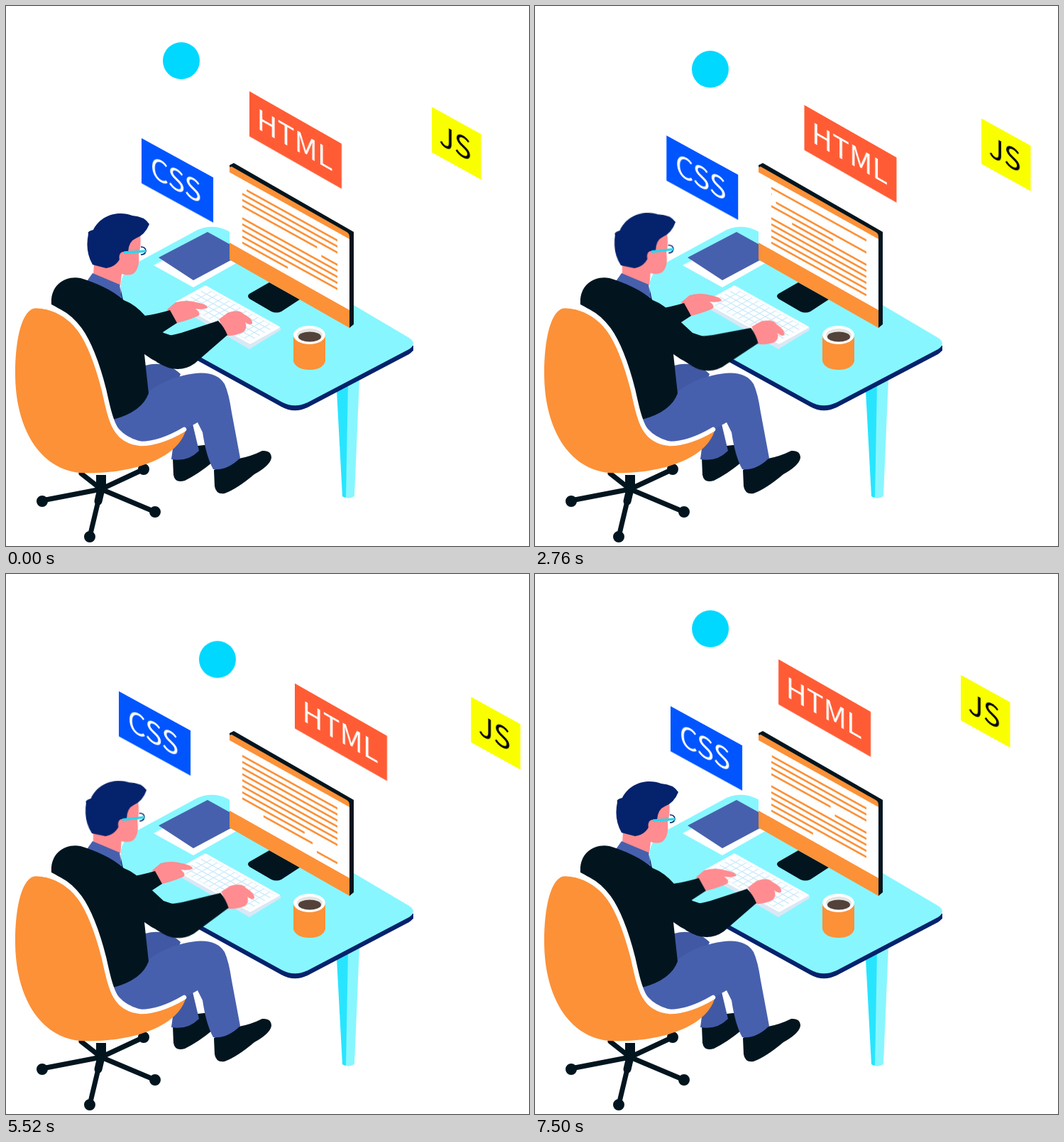
Animation of 737x760 px, one loop 7560 ms. Source, as an HTML page without scripts:

```html
<!DOCTYPE html>
<html lang="en">
<head>
<meta charset="utf-8">
<title>Developer at a desk</title>
<style>
html, body { margin: 0; width: 100%; height: 100%; overflow: hidden; background: #fff; }
svg { display: block; width: 737px; height: 760px; }
text { font: 40px "Noto Sans CJK SC", "Noto Sans CJK JP", "Noto Sans CJK", Lato, sans-serif; text-anchor: middle; fill: #fff; }

.ink { fill: #02151f; }
.orange { fill: #fc9138; }
.navy { fill: #05226c; }
.denim { fill: #4760ad; }
.shade { fill: #4159a4; }
.skin { fill: #ff8c90; }
.sky { fill: #88f6ff; }
.white { fill: #fff; }
.base { fill: none; stroke: #02151f; stroke-linecap: round; }

.css, .js, .ball, .head, .far, .near { animation: 7560ms cubic-bezier(.37, 0, .63, 1) infinite; }
.css { animation-name: css; }
.js { animation-name: js; }
.html { animation: html 1890ms cubic-bezier(.37, 0, .63, 1) infinite alternate; }
.ball { animation-name: ball; }
.head { animation-name: nod; transform-origin: 142px 385px; }
.far { animation-name: far; }
.near { animation-name: near; transform-origin: 225px 488px; }

@keyframes css {
  0%, 43%, 50.4%, 99%, 100% { transform: none; }
  19.8%, 73.2%, 79.4% { transform: translate(-32px, -21px); }
}
@keyframes html { to { transform: translate(65px, 34.5px); } }
@keyframes js {
  0%, 49.2%, 98.4%, 100% { transform: none; }
  24.6%, 73.8% { transform: translate(55.5px, 31px); }
}
@keyframes ball {
  0%, 100% { transform: translate(247px, 77px); }
  23% { transform: translate(305px, 132px); animation-timing-function: ease-in; }
  36.5% { transform: translate(247px, 89px); animation-timing-function: linear; }
  41.3% { transform: translate(231px, 75px); animation-timing-function: ease-out; }
  47.4% { transform: translate(183px, 38px); }
  74.7% { transform: translate(299px, 121px); }
}
@keyframes nod {
  0%, 100% { transform: none; }
  7.4% { transform: rotate(-4deg); }
  23.8% { transform: rotate(6deg); }
  41% { transform: rotate(-4.5deg); }
  60% { transform: rotate(8.5deg); }
  78% { transform: rotate(-5.2deg); }
}
@keyframes far {
  0%, 100% { transform: none; }
  8%, 46%, 62%, 90% { transform: translate(-21px, -10px); }
  54% { transform: translate(-8px, -6px); }
}
@keyframes near {
  0%, 100% { transform: none; }
  12%, 22% { transform: rotate(8.4deg); }
  36.5% { transform: rotate(7.5deg); }
  54% { transform: rotate(6.5deg); }
  64.3% { transform: rotate(3deg); }
  82%, 90% { transform: rotate(6deg); }
}

/* Two gaps run through the rows in reading order: 10 rows of 134 */
.rows { stroke: #fc9138; stroke-width: 3; }
.rows g { transform: translateY(calc(var(--i) * 8.55px)); }
.short, .long { stroke: #fff; stroke-width: 5; }
.short { stroke-dasharray: 76 1264; animation: short 7560ms linear infinite; }
.long { stroke-dasharray: 140 1200; animation: long 7560ms linear infinite; }
@keyframes short {
  0% { stroke-dashoffset: calc(var(--i) * 134px + 70px); }
  54% { stroke-dashoffset: calc(var(--i) * 134px - 757px); }
  81.75% { stroke-dashoffset: calc(var(--i) * 134px - 1149px); }
  100% { stroke-dashoffset: calc(var(--i) * 134px - 1270px); }
}
@keyframes long {
  0% { stroke-dashoffset: calc(var(--i) * 134px - 507px); }
  22.22% { stroke-dashoffset: calc(var(--i) * 134px - 1193px); }
  36.5% { stroke-dashoffset: calc(var(--i) * 134px - 1474px); }
  54% { stroke-dashoffset: calc(var(--i) * 134px - 1959px); }
  64.3% { stroke-dashoffset: calc(var(--i) * 134px - 2336px); }
  81.75% { stroke-dashoffset: calc(var(--i) * 134px - 2686px); }
  100% { stroke-dashoffset: calc(var(--i) * 134px - 3187px); }
}
</style>
</head>
<body>
<svg viewBox="0 0 737 760">
  <defs>
    <path id="line" d="M0 0H134"/>
    <path id="top" d="M270 315Q291 306 312 316L568 467Q580 475 568 483L425 558Q406 567 388 557L170 437L162 400Q158 376 185 361Z"/>
  </defs>

  <!-- floating labels -->
  <g class="css"><g transform="translate(191 186) skewY(28.7)">
    <rect width="101" height="63.5" fill="#0055ff"/><text x="48.5" y="46">CSS</text>
  </g></g>
  <g class="html"><g transform="translate(343 120) skewY(29.6)">
    <rect width="130" height="63.5" fill="#ff5c35"/><text x="64" y="46">HTML</text>
  </g></g>
  <g class="js"><g transform="translate(600 142) skewY(28.9)">
    <rect width="69.5" height="64" fill="#faff00"/><text x="33" y="46" style="fill:#000">JS</text>
  </g></g>
  <circle class="ball" r="26" fill="#00d8ff"/>

  <!-- legs and shoes -->
  <path class="ink" d="M235 636L270 619L288 617L291 642Q272 658 252 668Q238 672 236 660Z"/>
  <path class="ink" d="M293 653L328 637Q345 634 361 626Q374 625 374 636Q372 647 350 659Q325 680 308 686Q296 688 294 676Z"/>
  <path class="shade" d="M196 506Q225 498 246 518L230 560L196 560Z"/>
  <path class="shade" d="M238 600L262 584L272 626Q256 642 233 638Z"/>
  <path class="denim" d="M150 582L199 544Q222 526 250 520Q294 509 308 532Q314 545 318 572L330 636Q312 654 292 652Q282 634 277 600L270 586Q240 604 205 615Q165 612 150 582Z"/>

  <!-- desk -->
  <path d="M466 541L486 531L480 692Q476 692 474 690Z" fill="#28e5ff"/>
  <path class="sky" d="M482 533L498 525L491 690Q484 694 479 692Z"/>
  <use href="#top" class="navy" y="7"/>
  <path class="navy" d="M564 478H574V485L566 490Z"/>
  <use href="#top" class="sky"/>

  <path class="white" d="M208 365L250 342L326 361L264 396Z"/>
  <path class="denim" d="M215 354L284 318L322 339V355L264 386Z"/>

  <!-- monitor -->
  <path class="ink" d="M343 405L371 389L414 413L388 430Q381 433 374 430L343 412Q339 408 343 405Z"/>
  <path class="ink" d="M315 226V224L321 221L490 318V448L484 453Z"/>
  <path class="orange" d="M315 227L318 226L480 318Q484 320 484 325V453L315 357Z"/>
  <path class="white" d="M315 234L484 328V428L315 333Z"/>
  <g class="rows" transform="translate(333 256) skewY(28.9)">
    <g style="--i:0"><use href="#line"/><use href="#line" class="short"/><use href="#line" class="long"/></g>
    <g style="--i:1"><use href="#line"/><use href="#line" class="short"/><use href="#line" class="long"/></g>
    <g style="--i:2"><use href="#line"/><use href="#line" class="short"/><use href="#line" class="long"/></g>
    <g style="--i:3"><use href="#line"/><use href="#line" class="short"/><use href="#line" class="long"/></g>
    <g style="--i:4"><use href="#line"/><use href="#line" class="short"/><use href="#line" class="long"/></g>
    <g style="--i:5"><use href="#line"/><use href="#line" class="short"/><use href="#line" class="long"/></g>
    <g style="--i:6"><use href="#line"/><use href="#line" class="short"/><use href="#line" class="long"/></g>
    <g style="--i:7"><use href="#line"/><use href="#line" class="short"/><use href="#line" class="long"/></g>
    <g style="--i:8"><use href="#line"/><use href="#line" class="short"/><use href="#line" class="long"/></g>
    <g style="--i:9"><use href="#line"/><use href="#line" class="short"/><use href="#line" class="long"/></g>
  </g>

  <!-- keyboard -->
  <path d="M238 417L281 394L387 453V456L343 483L238 422Z" fill="#d9e8f4"/>
  <g transform="matrix(.883 .492 -.86 .48 281 393)">
    <rect width="120" height="50" rx="2" class="white"/>
    <rect x="5" y="4" width="110" height="42" fill="#c9e9fa"/>
    <path d="M5 8H115M5 16.5H115M5 25H115M5 33.5H115M5 42H115" stroke="#fff" stroke-width="7" stroke-dasharray="8 1.3"/>
  </g>

  <!-- mug -->
  <path class="orange" d="M405 463H450V500Q446 512 428 512Q409 512 405 500Z"/>
  <ellipse class="white" cx="427.500" cy="463" rx="22.500" ry="13"/>
  <ellipse cx="428" cy="463.500" rx="18" ry="9.500" fill="#e4e4e4"/>
  <ellipse cx="428" cy="465.500" rx="16" ry="7" fill="#53423a"/>

  <!-- far arm -->
  <g class="far">
    <path class="skin" d="M227 427L239 417Q255 413 268 417Q284 420 284 425Q276 428 267 426Q277 434 269 437Q252 444 237 447Z"/>
    <path class="ink" d="M160 425L195 436Q215 433 231 428L241 446L218 461L180 465Z"/>
  </g>

  <!-- head -->
  <g class="head">
    <path class="skin" d="M124 363L170 325L189 319Q191 338 187 349Q189 370 179 377Q172 380 163 377L161 394L123 380Z"/>
    <path class="navy" d="M116 321Q114 317 123 315C134 293 160 288 178 295Q195 296 202 307Q196 322 183 327Q173 331 172 346L163 347Q160 366 141 369L122 364Q111 345 116 321Z"/>
    <ellipse class="skin" cx="165" cy="354" rx="5.500" ry="8"/>
    <path d="M190 339Q197 339 197 345Q196 350 190 350" fill="none" stroke="#05226c" stroke-width="1.500"/>
    <path d="M166 347L197 345" stroke="#28d8ee" stroke-width="3.500"/>
  </g>

  <!-- torso -->
  <path class="denim" d="M122 376L160 392L163 412L112 390Z"/>
  <path class="ink" d="M64 420C62 392 84 379 105 383C126 389 150 400 166 414Q182 420 196 436L222 460L240 466L237 508Q216 506 195 490L198 518L201 545Q192 571 151 582L128 520C115 470 95 435 64 420Z"/>
  <g class="near">
    <path class="skin" d="M300 441L312 432Q328 426 334 433Q348 440 347 447Q343 450 337 445Q341 454 334 459Q322 465 311 464Z"/>
    <path class="ink" d="M212 467Q232 464 247 460L299 443Q307 451 312 463L266 503Q242 520 212 501Z"/>
  </g>

  <!-- chair -->
  <g class="base">
    <path d="M134 660V682" stroke-width="14" stroke-linecap="butt"/>
    <path d="M134 680L51 696M134 680L118 747M134 680L210 712M134 680L194 652M134 680L106 658" stroke-width="7"/>
    <path d="M51 697v0M118 747v0M210 712v0M194 652v0" stroke-width="16"/>
    <path d="M134 680L130 697" stroke-width="11"/>
  </g>
  <path class="orange" d="M44 425C22 424 13 470 13 517C13 595 48 652 105 657C170 660 240 640 253 598Q225 613 205 617C170 618 152 606 145 578C134 530 120 432 44 425Z"/>
  <path d="M38 422C98 420 121 474 138 540C148 585 153 613 190 616Q217 616 251 596" fill="none" stroke="#fff" stroke-width="6.500" stroke-linecap="round"/>
</svg>
</body>
</html>
```
